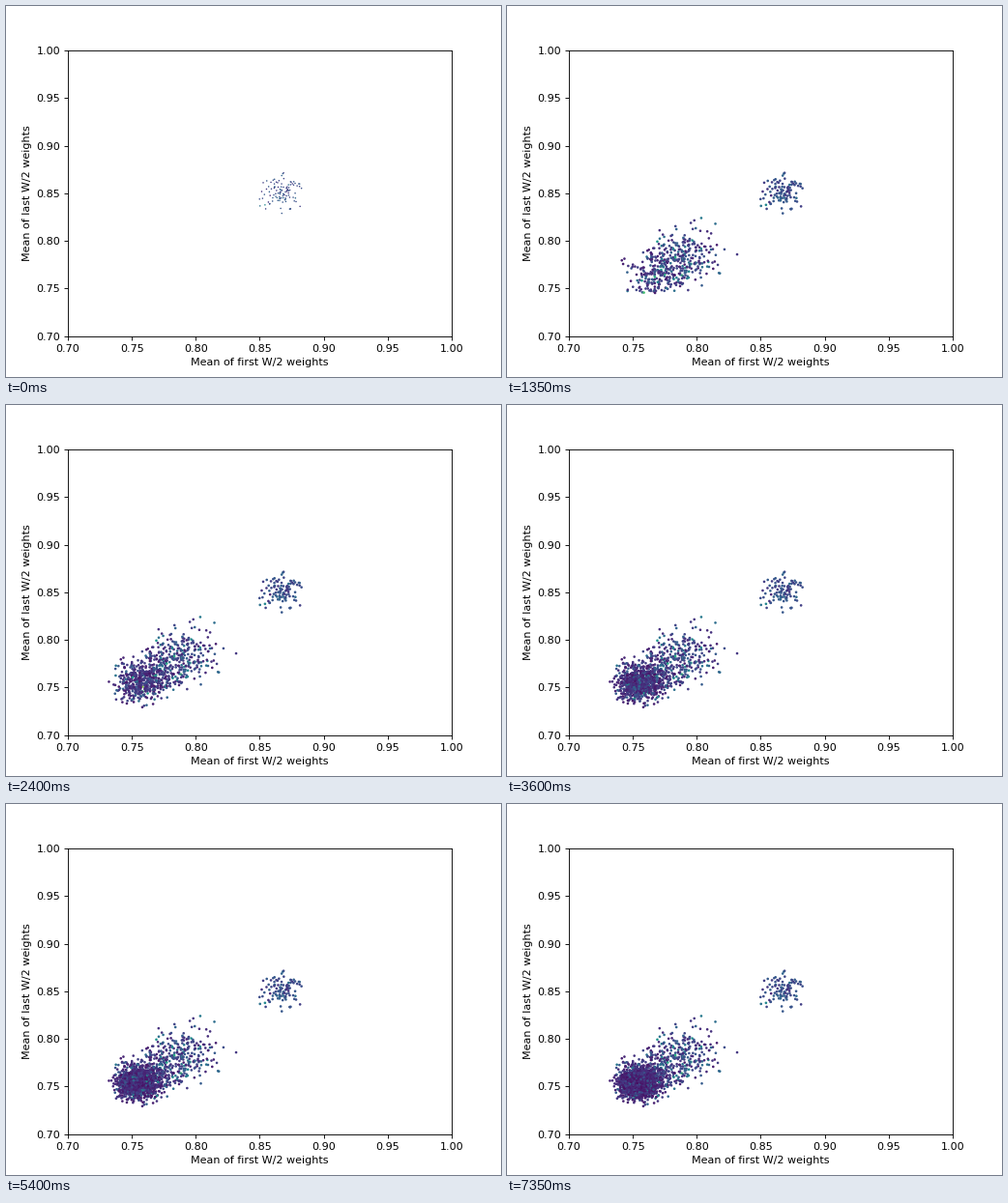
Recreate the animation shown at these times as a matplotlib script. Size 512 by 384 pixels, loop 7500 ms.

```python
import numpy as np
import matplotlib.pyplot as plt
from matplotlib.animation import FuncAnimation

FRAMES, STEP_MS = 50, 150
START_SIZE, BATCH = 105, 50
FIRST_AREA, AREA = 1.9, 5.6  # marker areas in square points

rng = np.random.default_rng(11)


def blob(n, centre, spread):
    """Gaussian cloud without its far tails."""
    r = np.sqrt(-2 * np.log(1 - .96 * rng.random(n)))
    a = 2 * np.pi * rng.random(n)
    return np.column_stack([centre[0] + spread[0] * r * np.cos(a),
                            centre[1] + spread[1] * r * np.sin(a)])


def generation(k):
    """Points that join at step k: the cloud slides down and tightens."""
    slide = 1 / (1 + np.exp((k - 5.5) / 2))
    centre = .755 + .046 * slide, .754 + .040 * slide
    sd = .0055 + .0095 * np.exp(-k / 20)
    late = np.exp(-k / 18)
    value = .03 + .05 * late + rng.gamma(1.8, .05 + .045 * late, BATCH)
    return np.column_stack([blob(BATCH, centre, (sd, sd)), value])


start = np.column_stack([blob(START_SIZE, (.868, .8515), (.009, .0095)),
                         rng.normal(.25, .06, START_SIZE)])
points = np.vstack([start] + [generation(k) for k in range(1, FRAMES)])
colors = plt.get_cmap("viridis")(np.clip(points[:, 2], 0, 1))

plt.rcParams["font.family"] = "DejaVu Sans"
fig, ax = plt.subplots(figsize=(6.4, 4.8), dpi=80)
ax.set(xlim=(.7, 1), ylim=(.7, 1),
       xlabel="Mean of first W/2 weights", ylabel="Mean of last W/2 weights")
dots = ax.scatter([], [], linewidths=0)


def update(k):
    n = START_SIZE + k * BATCH
    dots.set_offsets(points[:n, :2])
    dots.set_facecolors(colors[:n])
    dots.set_sizes([AREA if k else FIRST_AREA])
    return dots,


anim = FuncAnimation(fig, update, frames=FRAMES, interval=STEP_MS,
                     init_func=lambda: update(0), repeat=True, repeat_delay=0)
plt.show()
```
